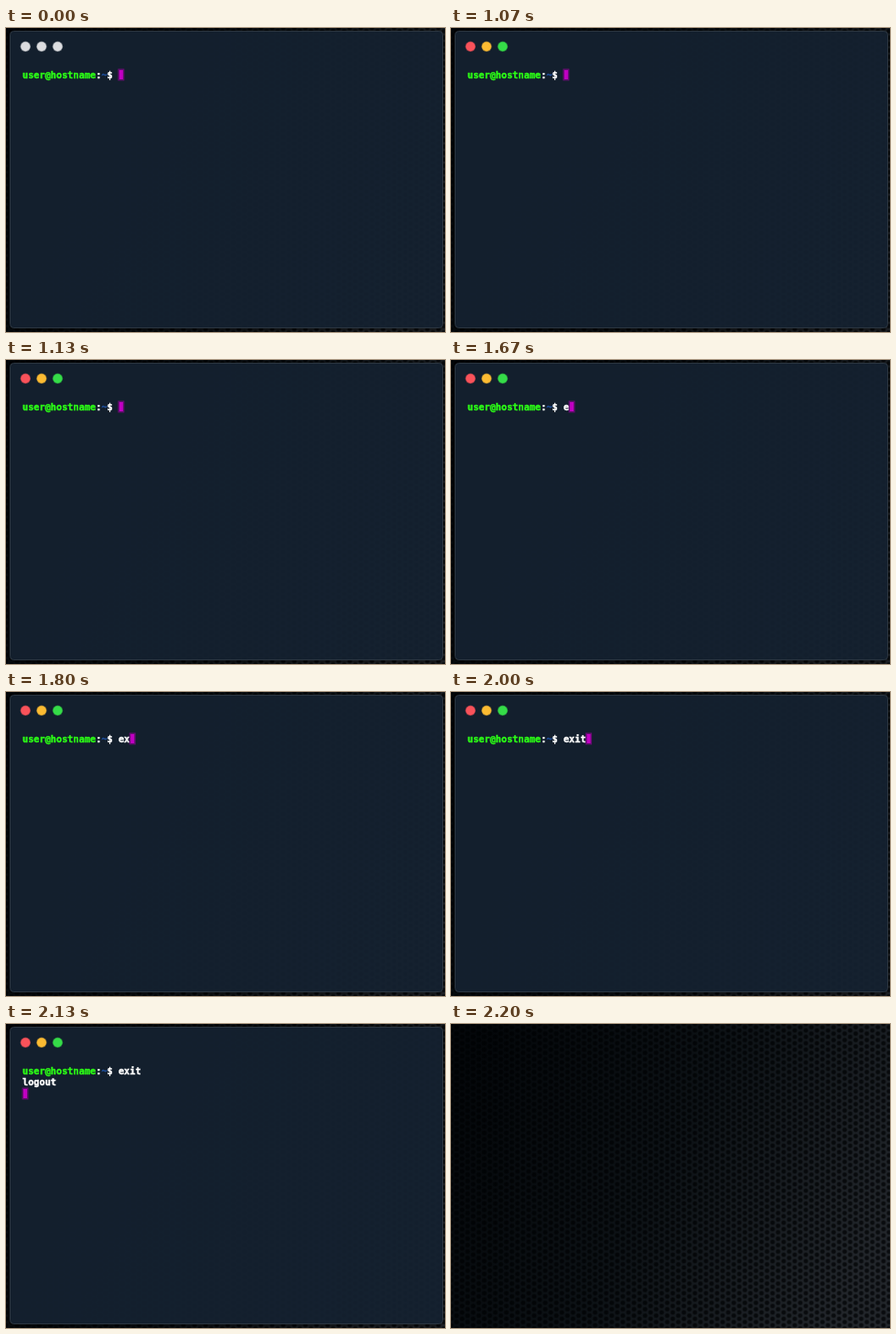
Animation of 480 by 332 pixels, one loop 3.67 s. Source, as an HTML page with a canvas:

```html
<!DOCTYPE html>
<html lang="en">
<head>
<meta charset="utf-8">
<title>Terminal exit</title>
<style>
html, body { margin: 0; width: 100%; height: 100%; overflow: hidden; background: #000; }
canvas { display: block; }
</style>
</head>
<body>
<canvas id="stage" width="480" height="332"></canvas>
<script>
const W = 480, H = 332, LOOP = 3670;
const HOVER = 1070, LOGOUT = 2130, CLOSE = 2200;
const KEYS = [1670, 1800, 1930, 2000];
const COMMAND = 'exit';
const FONT = 'bold 10.25px "DejaVu Sans Mono", monospace';
const CELL = 6.17, LEFT = 18, LINE = 12.5, BASELINE = 54.7;
const GREY = ['#dcdde0', '#dcdde0', '#dcdde0'];
const LIGHTS = ['#f9525a', '#fbbb32', '#35dc48'];
const ctx = document.getElementById('stage').getContext('2d');
const mesh = makeMesh();

function makeMesh() {
  const layer = document.createElement('canvas');
  layer.width = W;
  layer.height = H;
  const g = layer.getContext('2d');

  const base = g.createLinearGradient(40, 0, 470, 230);
  base.addColorStop(0, '#04070a');
  base.addColorStop(0.5, '#0d1216');
  base.addColorStop(1, '#22262b');
  g.fillStyle = base;
  g.fillRect(0, 0, W, H);

  // Perforated metal: hexagonal lattice with vertical neighbours.
  const pitch = 7, step = pitch * Math.sqrt(3) / 2;
  for (let col = 0; col * step < W + step; col++) {
    for (let y = col % 2 * pitch / 2; y < H + pitch; y += pitch) {
      g.fillStyle = 'rgba(0,2,4,0.35)';
      disc(g, col * step, y, 2.7);
      g.fillStyle = 'rgba(0,2,4,0.55)';
      disc(g, col * step, y, 2);
    }
  }
  return layer;
}

function disc(g, x, y, r) {
  g.beginPath();
  g.arc(x, y, r, 0, Math.PI * 2);
  g.fill();
}

function drawWindow(colors) {
  ctx.save();
  ctx.beginPath();
  ctx.roundRect(4.5, 3.5, 473, 324, 4);
  ctx.fillStyle = '#152130';
  ctx.shadowColor = 'rgba(0,0,0,0.6)';
  ctx.shadowBlur = 6;
  ctx.shadowOffsetY = 2;
  ctx.fill();
  ctx.restore();

  // The panel is slightly see-through.
  ctx.save();
  ctx.clip();
  ctx.globalAlpha = 0.06;
  ctx.drawImage(mesh, 0, 0);
  ctx.restore();
  ctx.strokeStyle = '#2c3640';
  ctx.lineWidth = 1;
  ctx.stroke();

  colors.forEach((color, i) => {
    const x = 21.3 + i * 17.6, y = 20.2;
    ctx.fillStyle = color;
    ctx.globalAlpha = 0.5;
    disc(ctx, x, y, 5.7);
    ctx.globalAlpha = 1;
    disc(ctx, x, y, 5);
  });
}

function write(text, col, row, color) {
  const x = LEFT + col * CELL, y = BASELINE + row * LINE;
  ctx.fillStyle = ctx.strokeStyle = color;
  ctx.lineWidth = 0.4;
  ctx.fillText(text, x, y);
  ctx.strokeText(text, x, y);
}

function drawCursor(col, row) {
  const x = LEFT + col * CELL, y = 44.5 + row * LINE;
  ctx.fillStyle = 'rgba(150,0,155,0.6)';
  ctx.fillRect(x - 0.5, y, 7, 13);
  ctx.fillStyle = '#c000c2';
  ctx.fillRect(x + 1, y + 1.5, 4, 10);
}

function drawTerminal(t) {
  const typed = KEYS.filter(k => t >= k).length;
  drawWindow(t < HOVER ? GREY : LIGHTS);
  ctx.font = FONT;
  write('user@hostname', 0, 0, '#2cff16');
  write(':', 13, 0, '#fff');
  write('~', 14, 0, '#1f4f9c');
  write('$', 15, 0, '#fff');
  write(COMMAND.slice(0, typed), 17, 0, '#fff');
  if (t >= LOGOUT) {
    write('logout', 0, 1, '#fff');
    drawCursor(0, 2);
  } else {
    drawCursor(17 + typed, 0);
  }
}

function draw(t) {
  ctx.drawImage(mesh, 0, 0);
  if (t < CLOSE) drawTerminal(t);
}

const start = performance.now();
function tick() {
  draw((performance.now() - start) % LOOP);
  requestAnimationFrame(tick);
}
tick();
</script>
</body>
</html>
```
